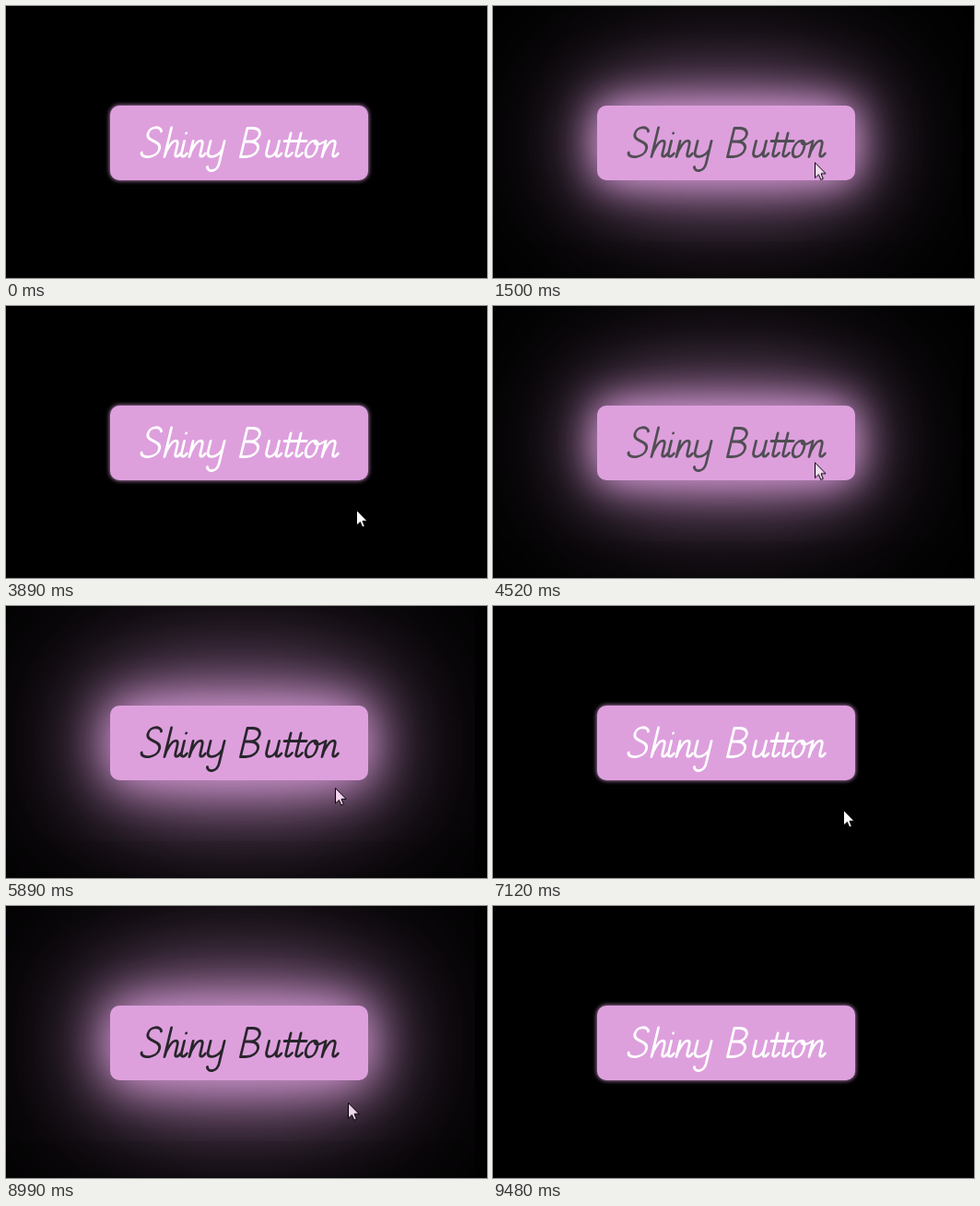
Write an HTML page that moves like this. It is 522 px wide and 295 px high and loops after 9890 ms.

```html
<!DOCTYPE html>
<html lang="en">
<head>
<meta charset="utf-8">
<title>Shiny Button</title>
<style>
  html, body { margin: 0; width: 100%; height: 100%; overflow: hidden; background: #000; }
  .stage { position: relative; width: 522px; height: 295px; overflow: hidden; background: #000; }
  .button {
    position: absolute; left: 113px; top: 108px; width: 280px; height: 81px;
    border: 0; padding: 0; border-radius: 10px; background: #dda0dd; color: #fff;
    cursor: inherit; font: italic 36px Lato, sans-serif;
  }
  .button span { opacity: 0; }
  .script { position: absolute; left: 0; top: 0; overflow: visible; }
  .script path {
    fill: none; stroke: currentColor; stroke-width: 2.8;
    stroke-linecap: round; stroke-linejoin: round;
  }
  .edge { position: absolute; left: 0; bottom: 0; width: 100%; height: 1px; background: #080808; }
  .pointer { position: absolute; left: 0; top: 0; overflow: visible; fill: #fff; opacity: 0; }
</style>
</head>
<body>
<div class="stage">
  <button class="button" type="button">
    <span>Shiny Button</span>
    <svg class="script" width="280" height="81" viewBox="113 108 280 81" aria-hidden="true"></svg>
  </button>
  <div class="edge"></div>
  <svg class="pointer" width="13" height="20" aria-hidden="true">
    <path d="M.5 .5V17L4.4 13.4L6.8 19L9.3 18L7 12.3H12Z" stroke="#000"/>
  </svg>
</div>
<script>
  const LOOP = 9890, FADE = 500;
  const button = document.querySelector('.button');
  const pointer = document.querySelector('.pointer');
  const script = document.querySelector('.script');

  // Upright pen strokes on a baseline at y = 0, slanted when placed
  const arch = 'M0 0C0-8 4-17.3 8-17.3C11.5-17.3 11-12 11-9V-4C11 1 14.5 .5 16.5-3.5';
  const glyphs = {
    S: 'M15-27.5C13-33.5 1-33.5 1-25C1-16 17.5-18 17.5-8.5C17.5 2-.5 2.5-1-4.5',
    h: 'M0-31.5V0' + arch,
    i: 'M0-17V-4C0 1 4 .5 6-3.5M0-25.5v.1',
    n: 'M0-17V0' + arch,
    y: 'M0-17V-5C0 2 11 2 15-8M15-17V7C15 17 5 17 3 11',
    B: 'M0-31V0M0-31H6C18-31 18-16.5 6-16.5H1M6-16.5C21-16.5 20 0 6 0H0',
    u: 'M0-17V-5C0 2 9 2 11-8M11-17V-4C11 1 14.5 .5 16.5-3.5',
    t: 'M0-25.5V-4C0 1 4 .5 6.5-4M-5-17H8',
    o: 'M7-17.3C-2-17.3-2.5 .3 5 .3C13 .3 13-17.3 7-17.3C8-12 13-13 17-16'
  };
  const pens = [147, 172, 189.5, 199, 218, 254.5, 281.5, 303, 314, 324, 343];
  script.innerHTML = [...'ShinyButton'].map((c, k) =>
    `<path d="${glyphs[c]}" transform="translate(${pens[k]} 163.5) skewX(-13.5)"/>`).join('');

  // Pointer visits: sets off, crosses the edge, turns back, is just outside at x, y
  const visits = [
    { start: 660, enter: 1250, turn: 2390, leave: 2800, x: 366, y: 197 },
    { start: 3890, enter: 4270, turn: 5350, leave: 5890, x: 357, y: 197 },
    { start: 7120, enter: 7500, turn: 8720, leave: 8990, x: 371, y: 213 }
  ];
  const below = [393, 295], home = [380, 221], door = [362, 189], goal = [336, 150];
  const lastVisit = visits.length - 1;
  const show = visits[0].start, hide = visits[lastVisit].leave + 480;

  const at = (t, style, easing = 'linear') => ({ offset: t / LOOP, easing, ...style });
  const spot = (t, [x, y]) => at(t, { transform: `translate(${x}px, ${y}px)` });
  const glow = sizes => sizes.map(s => `0 0 ${s}px #dda0dd`).join(', ');

  const hover = (off, on) => [
    at(0, off),
    ...visits.flatMap(({ enter, leave }) => [
      at(enter, off, 'ease'), at(enter + FADE, on),
      at(leave - 10, on, 'ease'), at(leave - 10 + FADE, off)
    ]),
    at(LOOP, off)
  ];

  const moves = visits.flatMap(({ start, enter, turn, leave, x, y }, k) => [
    spot(start, k === 0 ? below : home),
    spot(enter, door),
    spot(enter + FADE, goal),
    spot(turn, goal),
    spot(leave, [x, y]),
    spot(leave + 480, k === lastVisit ? below : home)
  ]);

  const now = document.timeline.currentTime || 0;
  function play(el, frames) {
    el.animate(frames, { duration: LOOP, iterations: Infinity }).startTime = now;
  }

  play(button, hover(
    { color: '#fff', boxShadow: glow([5]) },
    { color: '#262329', boxShadow: glow([50, 100, 200]) }
  ));
  play(pointer, hover({ fill: '#fff' }, { fill: '#f3d5f0' }));
  play(pointer, [spot(0, below), ...moves, spot(LOOP, below)]);
  play(pointer, [
    at(0, { opacity: 0 }, 'step-end'),
    at(show, { opacity: 1 }, 'step-end'),
    at(hide, { opacity: 0 }, 'step-end'),
    at(LOOP, { opacity: 0 })
  ]);
</script>
</body>
</html>
```
